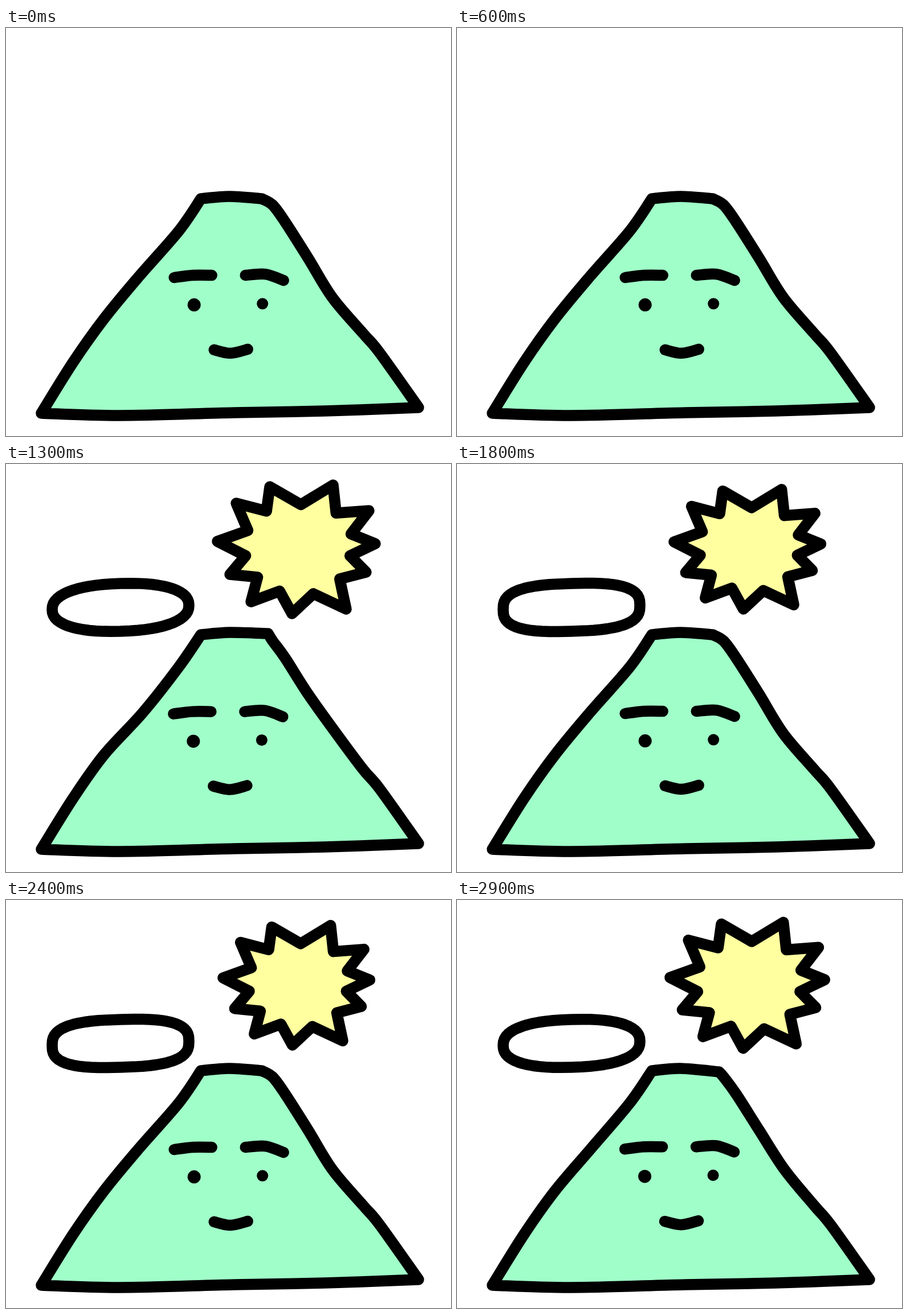
An HTML page with a canvas that plays this animation: 781 px wide and 717 px high, repeating every 3 s.

```html
<!DOCTYPE html>
<html lang="en">
<head>
<meta charset="utf-8">
<title>Mountain, sun and cloud</title>
<style>
html, body { margin: 0; width: 100%; height: 100%; overflow: hidden; background: #fff; }
canvas { display: block; }
</style>
</head>
<body>
<canvas id="stage" width="781" height="717"></canvas>
<script>
const ctx = document.getElementById('stage').getContext('2d');
const STEP = 100;
const STEPS = 30;

// The drawing alternates between three slightly different poses.
const poses = [
  { peak: [449, 300], lean: 0, sunSize: 0.93, roundness: 2.8 },
  { peak: [460, 298], lean: 7, sunSize: 1, roundness: 2.3 },
  { peak: [460, 302], lean: 2, sunSize: 0.98, roundness: 2.4 }
];

const sun = {
  from: [400, 300],
  home: [512, 148],
  tips: [[-49, -108], [62, -111], [125, -66], [136, -8], [120, 42], [85, 107],
    [-10, 115], [-82, 94], [-119, 46], [-141, -12], [-108, -79]]
};
const cloud = { from: [354, 370], home: [201, 252], rx: 120, ry: 42, slope: -0.03 };

const mix = (a, b, k) => a + (b - a) * k;
const mixPoint = (p, q, k) => [mix(p[0], q[0], k), mix(p[1], q[1], k)];
const wobble = seed => Math.sin(seed * 127.1 + 3) * 1.2;

// Extends a path through the points with a Catmull-Rom curve.
function addCurve(path, pts) {
  const at = i => pts[Math.max(0, Math.min(pts.length - 1, i))];
  for (let i = 0; i < pts.length - 1; i++) {
    const [a, b, c, d] = [at(i - 1), at(i), at(i + 1), at(i + 2)];
    path.bezierCurveTo(
      b[0] + (c[0] - a[0]) / 6, b[1] + (c[1] - a[1]) / 6,
      c[0] - (d[0] - b[0]) / 6, c[1] - (d[1] - b[1]) / 6,
      c[0], c[1]);
  }
}

function polygon(pts, [cx, cy], size) {
  const path = new Path2D();
  pts.forEach(([x, y]) => path.lineTo(cx + x * size, cy + y * size));
  path.closePath();
  return path;
}

function paint(path, fill) {
  ctx.fillStyle = fill;
  ctx.fill(path);
  ctx.stroke(path);
}

// A notch lies between neighbouring tips, pulled towards the middle.
function sunOutline() {
  const { tips } = sun;
  return tips.flatMap((tip, i) => {
    const between = mixPoint(tip, tips[(i + 1) % tips.length], 0.5);
    return [tip, mixPoint([3, 4], between, 0.71)];
  });
}

function cloudOutline(roundness) {
  const bend = v => Math.sign(v) * Math.abs(v) ** (2 / roundness);
  return Array.from({ length: 60 }, (_, i) => {
    const angle = i / 60 * Math.PI * 2;
    const x = cloud.rx * bend(Math.cos(angle));
    return [x, cloud.ry * bend(Math.sin(angle)) + cloud.slope * x];
  });
}

function drawSky(step, pose) {
  const progress = Math.max(0, Math.min(1, (step - 6) / 6));
  if (progress === 0) return;
  const rise = 1 - (1 - progress) ** 1.6;
  const place = thing => mixPoint(thing.from, thing.home, rise);
  paint(polygon(sunOutline(), place(sun), pose.sunSize * rise), '#ffffa0');
  paint(polygon(cloudOutline(pose.roundness), place(cloud), Math.sqrt(rise)), '#fff');
}

function drawBody({ peak, lean }) {
  const left = [62, 677], shoulder = [342, 300], right = [724, 667];
  const sides = [
    [left, [118, 587], [172, 511], [233 + lean, 437], [303, 357], shoulder],
    [shoulder, [392, 296], peak],
    [peak, [468, 311], [490, 341], [530, 404], [573 + lean, 474], [627, 537], [656, 571], right],
    [right, [560, 673], [400, 676], [200, 681], left]
  ];
  const path = new Path2D();
  path.moveTo(...left);
  sides.forEach(side => addCurve(path, side));
  path.closePath();
  paint(path, '#a0ffc8');
}

function drawArc(start, middle, end) {
  const path = new Path2D();
  path.moveTo(...start);
  addCurve(path, [start, middle, end]);
  ctx.stroke(path);
}

function drawEye(x, y, radius) {
  ctx.beginPath();
  ctx.arc(x, y, radius, 0, Math.PI * 2);
  ctx.fill();
}

function drawFace(seed) {
  ctx.save();
  ctx.translate(wobble(seed), wobble(seed + 7));
  drawArc([295, 438], [328, 434], [361, 434]);
  drawArc([420, 434], [455, 432], [487, 443]);
  drawArc([365, 565], [394, 571], [424, 564]);
  ctx.fillStyle = '#000';
  drawEye(330, 486, 11.5);
  drawEye(450, 484, 10);
  ctx.restore();
}

ctx.lineWidth = 19.5;
ctx.lineCap = ctx.lineJoin = 'round';
ctx.strokeStyle = '#000';

const start = performance.now();
function draw() {
  const step = Math.floor((performance.now() - start) / STEP) % STEPS;
  const index = step % poses.length;
  ctx.fillStyle = '#fff';
  ctx.fillRect(0, 0, 781, 717);
  drawSky(step, poses[index]);
  drawBody(poses[index]);
  drawFace(index);
  requestAnimationFrame(draw);
}
draw();
</script>
</body>
</html>
```
